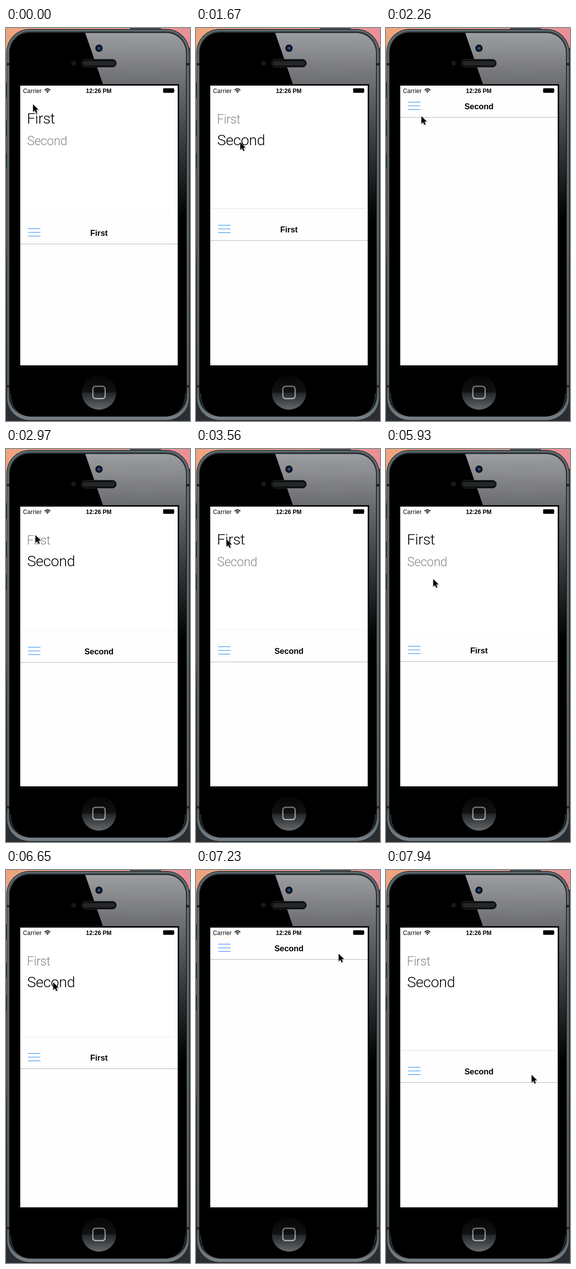
These frames come from a looping animation (374x798 px, 8 s). An HTML page:

```html
<!DOCTYPE html>
<html lang="en">
<head>
<meta charset="utf-8">
<title>Pull-down menu</title>
<style>
  html, body { margin: 0; width: 100%; height: 100%; overflow: hidden; background: #000; }
  svg { display: block; width: 374px; height: 798px; }
  text { font-family: "Liberation Sans", sans-serif; }
  .item { font-family: Roboto, Inter, sans-serif; font-weight: 300; font-size: 25.4px; letter-spacing: -.4px; fill: #868686; }
  .item.on { font-size: 30.4px; letter-spacing: -.5px; fill: #000; }
  .status { font-size: 12px; }
  .title { font-size: 16.4px; font-weight: bold; text-anchor: middle; }
</style>
</head>
<body>
<svg viewBox="0 0 374 798">
  <defs>
    <linearGradient id="sky">
      <stop offset="0" stop-color="#eda47e"/><stop offset=".6" stop-color="#efa293"/><stop offset="1" stop-color="#e98f96"/>
    </linearGradient>
    <linearGradient id="side" x2="0" y2="1">
      <stop offset="0" stop-color="#e9a17f"/><stop offset=".24" stop-color="#d4987f"/>
      <stop offset=".38" stop-color="#96787a"/><stop offset=".54" stop-color="#a67870"/>
      <stop offset=".6" stop-color="#45484e"/><stop offset="1" stop-color="#24272b"/>
    </linearGradient>
    <linearGradient id="rim" x2="0" y2="1">
      <stop offset="0" stop-color="#3d474b"/><stop offset=".1" stop-color="#566064"/>
      <stop offset=".5" stop-color="#485256"/><stop offset=".92" stop-color="#3c4549"/><stop offset="1" stop-color="#7b8589"/>
    </linearGradient>
    <linearGradient id="glare" gradientUnits="userSpaceOnUse" x1="0" y1="11" x2="0" y2="390">
      <stop offset="0" stop-color="#9b9da1"/><stop offset=".28" stop-color="#6a6b6f"/>
      <stop offset=".6" stop-color="#38393b"/><stop offset="1" stop-color="#000"/>
    </linearGradient>
    <linearGradient id="home" x2="0" y2="1">
      <stop offset="0" stop-color="#050505"/><stop offset=".5" stop-color="#111213"/>
      <stop offset=".51" stop-color="#222426"/><stop offset="1" stop-color="#66696c"/>
    </linearGradient>
    <linearGradient id="glyph" x2="0" y2="1">
      <stop offset="0" stop-color="#77797b"/><stop offset="1" stop-color="#b3b5b7"/>
    </linearGradient>
    <radialGradient id="lens">
      <stop offset="0" stop-color="#416ca7"/><stop offset=".35" stop-color="#1c355e"/>
      <stop offset=".7" stop-color="#090d18"/><stop offset="1" stop-color="#15171c"/>
    </radialGradient>
    <pattern id="mesh" width="3" height="3" patternUnits="userSpaceOnUse">
      <rect width="3" height="3" fill="#171819"/><path d="M0 0h1v1h-1zM1.5 1.5h1v1h-1z" fill="#55575a"/>
    </pattern>
    <clipPath id="screen"><rect x="29" y="117" width="320" height="568"/></clipPath>
    <clipPath id="glass"><rect x="8" y="10" width="358" height="778" rx="40"/></clipPath>
  </defs>

  <!-- desktop and handset -->
  <rect width="374" height="798" fill="url(#side)"/>
  <rect width="374" height="60" fill="url(#sky)"/>
  <rect x="371" y="40" width="3" height="758" fill="#34383c"/>
  <rect y="750" width="374" height="48" fill="#2a2d31"/>
  <rect x="252" width="63" height="5" rx="1" fill="#454d51"/>
  <path d="M0 110h2v32H0zM0 188h2v32H0zM0 254h2v32H0z" fill="#30373c"/>
  <rect x="1.5" y="2.5" width="371" height="794" rx="46" fill="url(#rim)" stroke="#252c30"/>
  <rect x="4" y="5" width="366" height="789" rx="44" fill="none" stroke="#747f83" stroke-width="1.4"/>
  <path d="M1 71h7v5H1zM366 71h7v5h-7zM1 725h7v5H1zM366 725h7v5h-7z" fill="#20272a"/>
  <rect x="7" y="9" width="360" height="780" rx="41"/>
  <path d="M161 10H367V390H349V117H198Z" fill="url(#glare)" clip-path="url(#glass)"/>
  <path d="M9 742Q10 786 50 790H324Q364 786 365 742" fill="none" stroke="#697276"/>
  <circle cx="189" cy="41" r="7.5" fill="url(#lens)"/>
  <circle cx="137.5" cy="71.5" r="5" fill="#17181a"/>
  <rect x="153.5" y="63.5" width="71" height="16" rx="8" fill="#0b0c0d" stroke="#292b2d"/>
  <rect x="156" y="67" width="66" height="9" rx="4.5" fill="url(#mesh)"/>
  <circle cx="189" cy="740" r="35" fill="url(#home)"/>
  <rect x="176.5" y="727.5" width="25" height="25" rx="5.5" fill="none" stroke="url(#glyph)" stroke-width="2.4"/>
  <rect x="26" y="114" width="326" height="575" fill="#090a0a"/>
  <rect x="28" y="116" width="322" height="570"/>

  <!-- screen -->
  <g clip-path="url(#screen)">
    <rect x="29" y="117" width="320" height="568" fill="#fff"/>
    <text id="first" class="item" x="42.5" y="194">First</text>
    <text id="second" class="item" x="43" y="238">Second</text>
    <g id="panel">
      <rect x="29" y="117" width="320" height="568" fill="#fefefe"/>
      <path id="edge" d="M32 116.5H346" stroke="#e2e2e2"/>
      <path d="M29 181.5H349" stroke="#b7b7b7"/>
      <path d="M45 150.5h25M45 158h25M45 165.5h25" stroke="#1681fb" stroke-width="1.1"/>
      <text id="title" class="title" x="189" y="165">First</text>
    </g>
    <text class="status" x="34.5" y="131.5" letter-spacing=".2">Carrier</text>
    <path d="M78.5 126q5.75-5 11.5 0M80.7 128.3q3.55-3 7.1 0" fill="none" stroke="#000" stroke-width="1.7"/>
    <path d="M84.25 131.7l-2-2q2-1.5 4 0z"/>
    <text class="status" x="188.5" y="131.5" font-weight="bold" text-anchor="middle">12:26 PM</text>
    <rect x="319.5" y="122.5" width="22" height="9" rx="1.5" stroke="#555" stroke-width=".7"/>
    <path d="M342.5 125.5q1.5 1.5 0 3z"/>
  </g>
  <path id="cursor" d="M0 0V15.3L3.5 12L6 17.5L8.5 16.4L6.1 11.1H11Z" stroke="#fff" paint-order="stroke"
    style="filter:drop-shadow(0 1px 1px #0006)"/>
</svg>

<script>
const LOOP = 8000, TICK = 118.4;

// pointer path: tick, x, y
const path = [
  [0, 55, 155], [4, 55, 155], [5, 55, 162], [7, 57, 178], [10, 84, 257], [12, 90, 232],
  [16, 90, 232], [19, 72, 179], [21, 57, 167], [23, 57, 167], [27, 62, 183], [36, 62, 183],
  [38, 58, 153], [40, 58, 153], [42, 137, 161], [44, 136, 162], [47, 136, 611], [50, 96, 264],
  [52, 96, 228], [56, 96, 228], [61, 290, 170], [63, 290, 170], [67, 296, 416]
];

// panel moves: start tick, then one offset per tick, or the grab height of a drag
const moves = [
  { from: 0, offsets: [257, 250] },
  { from: 14, offsets: [250, 257, 236, 140, 14, 0] },
  { from: 23, offsets: [40, 182, 252, 260, 250] },
  { from: 30, offsets: [251, 257, 130, 0] },
  { from: 44, grab: 162 },
  { from: 48, offsets: [340, 254, 250] },
  { from: 54, offsets: [250, 258, 222, 110, 0] },
  { from: 64, grab: 166 }
];
const selections = { 0: "First", 14: "Second", 30: "First", 54: "Second" };
const titles = { 0: "First", 19: "Second", 33: "First", 58: "Second" };

const [first, second, panel, edge, title, cursor] =
  ["first", "second", "panel", "edge", "title", "cursor"].map(id => document.getElementById(id));
const place = (node, x, y) => node.setAttribute("transform", `translate(${x} ${y})`);
const labelAt = (labels, tick) => Object.entries(labels).findLast(([start]) => start <= tick)[1];

function pointerAt(tick) {
  const i = path.findLastIndex(([start]) => start <= tick);
  const [start, x, y] = path[i];
  const [end, nextX, nextY] = path[i + 1] ?? [start + 1, x, y];
  const part = (tick - start) / (end - start);
  return [x + (nextX - x) * part, y + (nextY - y) * part].map(Math.round);
}

function panelAt(tick, pointerY) {
  const { from, offsets, grab } = moves.findLast(move => move.from <= tick);
  if (grab) return [pointerY - grab, true];
  const last = offsets.length - 1;
  return [offsets[Math.min(tick - from, last)], tick - from < last];
}

function draw(now) {
  const tick = Math.floor(now % LOOP / TICK);
  const [x, y] = pointerAt(tick);
  const [offset, moving] = panelAt(tick, y);
  const selected = labelAt(selections, tick);
  place(cursor, x, y);
  place(panel, 0, offset);
  edge.setAttribute("opacity", !moving || offset > 252 ? 0 : offset === 250 ? 1 : .4);
  for (const item of [first, second])
    item.classList.toggle("on", item.textContent === selected);
  title.textContent = labelAt(titles, tick);
}

function play() {
  draw(performance.now());
  requestAnimationFrame(play);
}
play();
</script>
</body>
</html>
```
